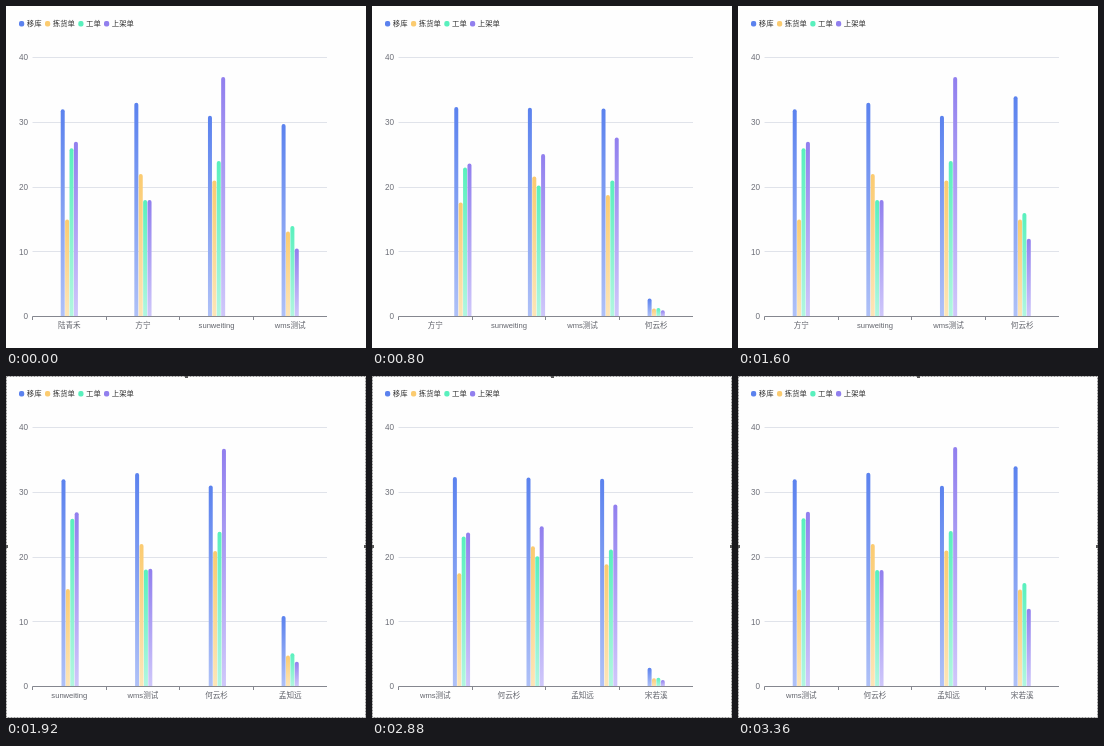
An HTML page with a canvas that plays this animation: 360 by 342 pixels, repeating every 3.52 s.

```html
<!DOCTYPE html>
<html lang="zh">
<head>
<meta charset="utf-8">
<style>
  html, body { margin: 0; width: 100%; height: 100%; overflow: hidden; background: #fefefe; }
  canvas { display: block; width: 360px; height: 342px; }
</style>
</head>
<body>
<canvas id="chart"></canvas>
<script>
const W = 360, H = 342, LOOP = 3520, STEP = 160, SPEED = 1.95;
const LEFT = 26.5, RIGHT = 321, BASE = 310.5, UNIT = 6.475;
const SLOT = (RIGHT - LEFT) / 4, BAR = 4, PITCH = 4.4;
const FONT = '"Liberation Sans", "Noto Sans CJK SC", "Noto Sans CJK", sans-serif';

const series = [
  { name: '移库', x: 13, top: '#5b82ee', bottom: '#afc1f7', data: [32, 33, 31, 34] },
  { name: '拣货单', x: 39, top: '#fbcb70', bottom: '#fde5b8', data: [15, 22, 21, 15] },
  { name: '工单', x: 72.3, top: '#59f0bd', bottom: '#b2f6e0', data: [26, 18, 24, 16] },
  { name: '上架单', x: 98, top: '#917fee', bottom: '#cfc7fa', data: [27, 18, 37, 12] }
];
const people = ['陆青禾', '方宁', 'sunweiting', 'wms测试', '何云杉', '孟知远', '宋若溪'];
const starts = [-351, 660, 1699, 2738]; // when each window of four people slides in
const SELECT_AT = 1920;

const canvas = document.getElementById('chart');
const ctx = canvas.getContext('2d');
const ratio = window.devicePixelRatio || 1;
canvas.width = W * ratio;
canvas.height = H * ratio;
ctx.scale(ratio, ratio);

const ease = p => p >= 1 ? 1 : p < 0.5 ? 4 * p ** 3 : 1 - (2 - 2 * p) ** 3 / 2;
const mix = (a, b, k) => a + (b - a) * k;

function text(str, x, y, align, color, size) {
  ctx.font = `${size}px ${FONT}`;
  ctx.textAlign = align;
  ctx.textBaseline = 'alphabetic';
  ctx.fillStyle = color;
  ctx.fillText(str, x, y);
}

function line(x1, y1, x2, y2, color) {
  ctx.strokeStyle = color;
  ctx.lineWidth = 1;
  ctx.beginPath();
  ctx.moveTo(x1, y1);
  ctx.lineTo(x2, y2);
  ctx.stroke();
}

function drawLegend() {
  for (const s of series) {
    ctx.fillStyle = s.top;
    ctx.beginPath();
    ctx.roundRect(s.x, 15, 5.2, 5.4, 2);
    ctx.fill();
    text(s.name, s.x + 7.8, 20.3, 'left', '#333', 7.4);
  }
}

function drawAxes(names) {
  for (let v = 0; v <= 40; v += 10) {
    const y = BASE - v * UNIT;
    if (v) line(LEFT, Math.floor(y) + 0.5, RIGHT, Math.floor(y) + 0.5, '#e0e3ea');
    text(v, 22, y + 2.8, 'right', '#6e7079', 8.2);
  }
  names.forEach((name, i) => text(name, LEFT + SLOT * (i + 0.5), 321.6, 'center', '#62646c', 7.6));
}

function drawBar(s, x, value) {
  const height = value * UNIT, y = BASE - height;
  if (height < 0.1) return;
  const fill = ctx.createLinearGradient(0, y, 0, BASE);
  fill.addColorStop(0, s.top);
  fill.addColorStop(1, s.bottom);
  ctx.fillStyle = fill;
  ctx.beginPath();
  ctx.roundRect(x, y, BAR, height, [2, 2, 0, 0]);
  ctx.fill();
}

function drawBars(elapsed) {
  const slide = ease(elapsed / 500), grow = ease(elapsed / 1000);
  series.forEach((s, k) => s.data.forEach((value, i) => {
    const x = LEFT + SLOT * (i + 0.5) - 8.6 + k * PITCH;
    if (i === 3) drawBar(s, x, value * grow);
    else drawBar(s, x + SLOT * (1 - slide), mix(s.data[i + 1], value, slide));
  }));
}

function drawBaseline() {
  line(LEFT, BASE, RIGHT, BASE, '#85878f');
  for (let i = 0; i < 4; i++) {
    const x = Math.floor(LEFT + SLOT * i) + 0.5;
    line(x, BASE, x, BASE + 3.5, '#85878f');
  }
}

function drawSelection() {
  ctx.setLineDash([2, 1]);
  ctx.strokeStyle = '#929292';
  ctx.strokeRect(0.5, 0.5, W - 1, H - 1);
  ctx.setLineDash([]);
  ctx.fillStyle = '#555';
  ctx.fillRect(179, 0, 3, 2);
  ctx.fillRect(0, 169, 2, 3);
  ctx.fillRect(W - 2, 169, 2, 3);
}

function draw(now) {
  const t = Math.floor((now % LOOP) / STEP) * STEP;
  const first = starts.filter(start => start <= t).length - 1;
  ctx.fillStyle = '#fefefe';
  ctx.fillRect(0, 0, W, H);
  drawLegend();
  drawAxes(people.slice(first, first + 4));
  drawBars((t - starts[first]) * SPEED);
  drawBaseline();
  if (t >= SELECT_AT) drawSelection();
}

const origin = performance.now();
function tick() {
  draw(performance.now() - origin);
  requestAnimationFrame(tick);
}
tick();
</script>
</body>
</html>
```
